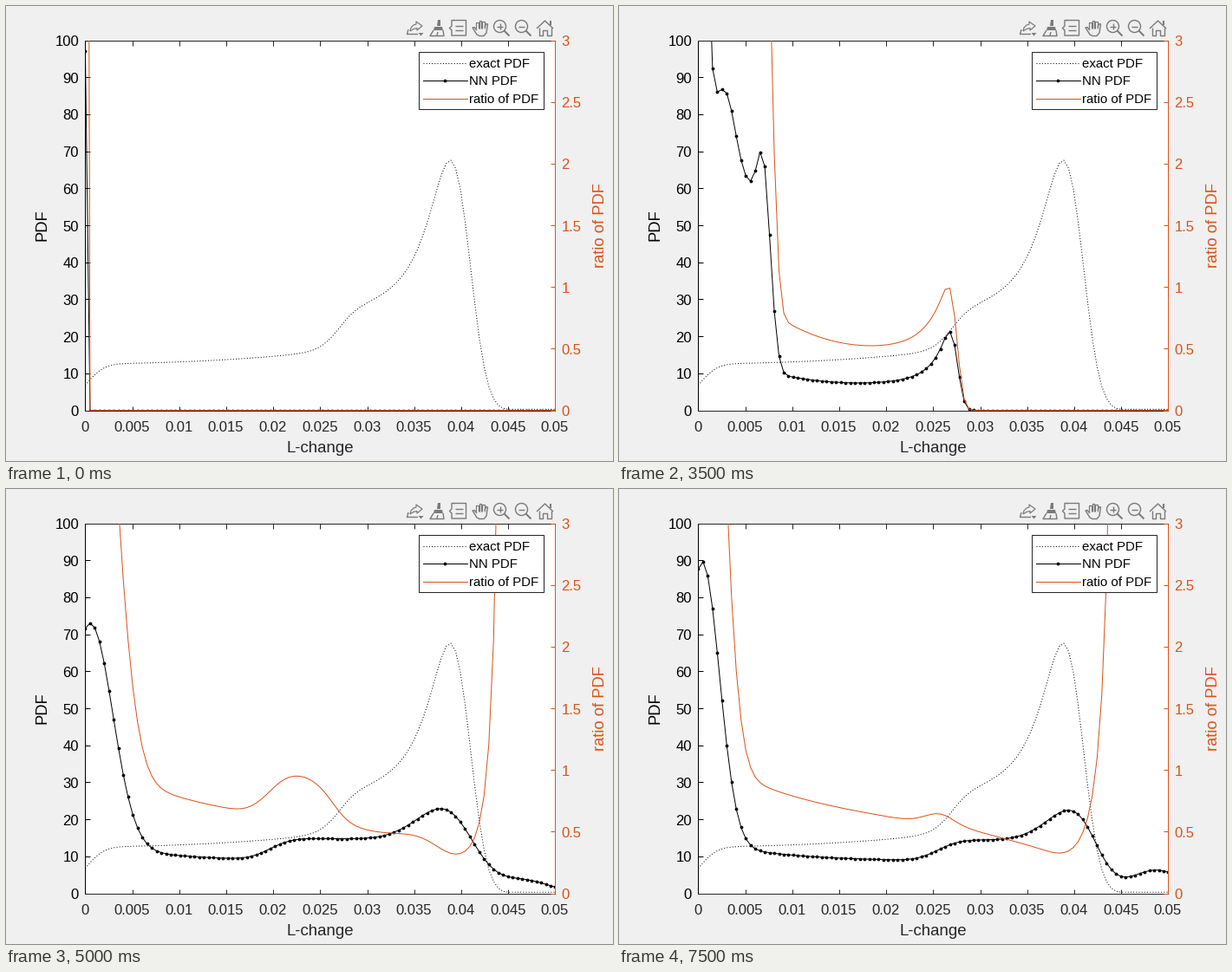
Animation, 700 px wide and 525 px high, one loop 8000 ms. Source, as a matplotlib script:

```python
import math
import numpy as np
import matplotlib.pyplot as plt
from matplotlib.animation import FuncAnimation
from matplotlib.patches import Circle, Polygon, Rectangle

plt.rcParams["font.family"] = "Liberation Sans"

W, H, DPI = 700, 525, 72
# Just off the half pixel, so that lines snap to the wanted row and column.
LEFT, RIGHT, TOP, BOTTOM = 91.45, 633.45, 39.55, 466.55
ORANGE, DARK, GRAY = "#d95319", "#262626", "#7a7a7a"
N = 100
K = np.arange(N, dtype=float)
X = np.linspace(0, 0.05, N)

erfc = np.vectorize(math.erfc, otypes=[float])


def rise(k, center, width):
    return 0.5 * erfc((center - k) / (width * math.sqrt(2)))


def fall(k, center, width):
    return rise(-k, -center, width)


def bump(k, height, center, width):
    return height * np.exp(-0.5 * ((k - center) / width) ** 2)


def mix(a, b, t):
    return a + (b - a) * t


def exact_pdf(k):
    shelf = 11 / (1 + np.exp(-(k - 53.4) / 2))
    ramp = 17.1 * np.exp(0.205 * (k - 71))
    flat = 12.6 * rise(k, -0.3, 3.2) + 0.00125 * k ** 2
    return (flat + shelf + ramp) * fall(k, 79, 2.9)


def spike(height, edge):
    """All of the mass in the first few samples."""
    return height * fall(K, edge, 0.1)


def front(scale):
    """Rippled block with a shallow bowl ahead of it, spreading to the right."""
    k = K / scale
    block = 48 + bump(k, 24, 5.6, 2.2) + bump(k, 14, 13.7, 1.2)
    bowl = 7.4 + 0.008 * (k - 34) ** 2 + 4.8 * np.exp(0.37 * np.minimum(k - 50, 10))
    return (740 * np.exp(-1.25 * k) + block * fall(k, 15.5, 1.18)
            + bowl * fall(k, 54.15, 1.08)) / scale


def mixture(hump, hump_w, tail, shelf, shelf_at, peak, peak_at, peak_w,
            cut, cut_w, last, last_at):
    body = (bump(K, hump, hump_w / 4, hump_w) + 8.6 + tail * np.exp(-K / 16)
            + shelf * rise(K, shelf_at, 3.6) + bump(K, peak, peak_at, peak_w))
    return body * fall(K, cut, cut_w) + bump(K, last, last_at, 5.6)


# Key poses of the mixture, in the order of its arguments.
POSE_TIMES = [4000, 4500, 5500, 6500, 7500]
POSES = np.array([
    (58, 6.2, 4, 5, 34, 8.5, 74, 7, 82, 5.6, 0, 92),
    (51.2, 5.25, 4.6, 5.7, 29.5, 10.5, 76, 7.5, 83.05, 5.4, 0, 92),
    (67.3, 4.05, 6.5, 6.2, 48.4, 9.2, 78, 5.6, 82.7, 4, 7, 92.5),
    (73.2, 3.72, 6.5, 5.7, 50.5, 9.3, 80, 6, 84.6, 3.7, 6.45, 96.3),
    (75.4, 3.58, 6, 5.7, 50.5, 9.5, 80, 6, 84.6, 3.7, 6.3, 96.5),
])


def nn_pdf(ms):
    if ms < 2000:
        return spike([97, 120, 600, 2000][ms // 500], 0.5)
    if ms < 3000:
        return spike(400, 1.5) if ms < 2500 else spike(180, 3.93)
    if ms < 4000:
        return front(0.45 if ms < 3500 else 1)
    return mixture(*(np.interp(ms, POSE_TIMES, p) for p in POSES.T))


exact = exact_pdf(K)

fig = plt.figure(figsize=(W / DPI, H / DPI), dpi=DPI, facecolor="#f0f0f0")
ax = fig.add_axes([LEFT / W, 1 - BOTTOM / H, (RIGHT - LEFT) / W, (BOTTOM - TOP) / H])
ax.set(xlim=(0, 0.05), ylim=(0, 100), xticks=np.arange(11) * 0.005,
       yticks=np.arange(0, 101, 10))
ax.tick_params(direction="in", length=5.5, width=1, top=True,
               labelbottom=False, labelleft=False)
ax.tick_params(axis="x", color=DARK)
for side, color in dict(left="black", right=ORANGE, top=DARK, bottom=DARK).items():
    ax.spines[side].set(color=color, linewidth=1)

twin = ax.twinx()
twin.set(ylim=(0, 3), yticks=np.arange(7) * 0.5)
twin.tick_params(direction="in", length=5.5, width=1, color=ORANGE, labelright=False)
for spine in twin.spines.values():
    spine.set_visible(False)

DOTS = dict(color="black", lw=1, ls=(0, (1, 2.2)), dash_capstyle="butt")
FIT = dict(color="black", lw=1, marker="o", ms=3.8, mew=0)

ax.plot(X, np.maximum(exact, 0.3), **DOTS)
fit_line, = ax.plot([], [], **FIT)
ratio_line, = twin.plot([], [], color=ORANGE, lw=1)

# Pixel-space layer for text, legend and toolbar.
ui = fig.add_axes([0, 0, 1, 1], zorder=5)
ui.set(xlim=(0, W), ylim=(H, 0))
ui.axis("off")


def label(x, y, s, size=16.67, color=DARK, ha="center", rotation=0):
    ui.text(x, y, s, fontsize=size, color=color, ha=ha, va="baseline",
            rotation=rotation, rotation_mode="anchor")


for i in range(11):
    label(mix(LEFT, RIGHT, i / 10) - 0.5, 491, f"{i * 0.005:g}")
    label(84, mix(BOTTOM, TOP, i / 10) + 6.5, str(i * 10), color="black", ha="right")
for i in range(7):
    label(640.3, mix(BOTTOM, TOP, i / 6) + 6.5, f"{i * 0.5:g}", color=ORANGE, ha="left")
label(362.5, 515, "L-change", 18.6)
label(46, 253, "PDF", 18.4, "black", rotation=90)
label(689.5, 253, "ratio of PDF", 18.4, ORANGE, rotation=90)

ui.add_patch(Rectangle((476.45, 52.55), 144, 66, fc="white", ec=DARK, lw=1))
for y, name, style in [(65.55, "exact PDF", DOTS),
                       (85.55, "NN PDF", dict(color="black", lw=1)),
                       (106.55, "ratio of PDF", dict(color=ORANGE, lw=1))]:
    ui.plot([481, 532], [y, y], **style)
    label(534.5, y + 5.5, name, 15, "black", ha="left")
ui.plot([506.45], [85.55], **FIT)


def stroke(*pts, lw=1.4):
    ui.plot(*zip(*pts), color=GRAY, lw=lw, solid_capstyle="butt")


def fill(*pts):
    ui.add_patch(Polygon(pts, fc=GRAY, ec="none"))


def draw_toolbar():
    # export
    stroke((464, 27), (462.5, 32.5), (475, 32.5))
    stroke((466, 29), (467, 25), (470, 22), (473, 21), (473, 18), (480, 23),
           (474, 28), (474, 25.5), (470, 26.5), (466, 29), lw=1.2)
    fill((475.5, 31), (481.5, 31), (478.5, 34.5))
    # brush
    fill((497.5, 16), (501, 16), (501, 23), (496.5, 23))
    fill((494, 24), (503, 24), (504, 28), (493, 28))
    stroke((493, 28), (489, 34.5), (505, 34.5), (504, 28))
    stroke((497, 34), (498, 30))
    # data tip
    stroke((516, 16.5), (530.5, 16.5), (530.5, 34), (514, 34), (514, 28),
           (511.5, 25.5), (514, 23), (514, 16.5), (517, 16.5))
    stroke((518, 22.5), (527, 22.5))
    stroke((518, 28), (527, 28))
    # hand
    stroke((543, 28), (540, 24.5), (538, 25), (543, 33), (546, 34.5), (551, 34.5),
           (554, 31), (555.5, 21), (553.5, 20.5), (552, 25))
    for x, top in [(543, 19), (546.5, 17), (550, 17.5)]:
        stroke((x - 1, 26), (x - 1, top), (x + 1.5, top), (x + 1.5, 26), lw=1.2)
    # zoom in, zoom out
    for x in (569.5, 594.5):
        ui.add_patch(Circle((x, 23.5), 7, fc="none", ec=GRAY, lw=1.4))
        stroke((x - 3.5, 23.5), (x + 3.5, 23.5))
        stroke((x + 5, 28.5), (x + 11, 34.5), lw=2)
    stroke((569.5, 20), (569.5, 27))
    # home
    stroke((612, 26), (621.5, 17), (631, 26))
    stroke((614.5, 25), (614.5, 34), (619, 34), (619, 28), (624, 28), (624, 34),
           (628.5, 34), (628.5, 25))
    stroke((627.5, 17), (627.5, 22), lw=2)


draw_toolbar()

STEP, LOOP = 500, 8000


def update(i):
    fit = nn_pdf(i * STEP)
    fit_line.set_data(X, fit)
    ratio_line.set_data(X, np.minimum(fit / exact, 300))
    return fit_line, ratio_line


anim = FuncAnimation(fig, update, frames=LOOP // STEP, interval=STEP,
                     repeat=True, repeat_delay=0, blit=False)
plt.show()
```
